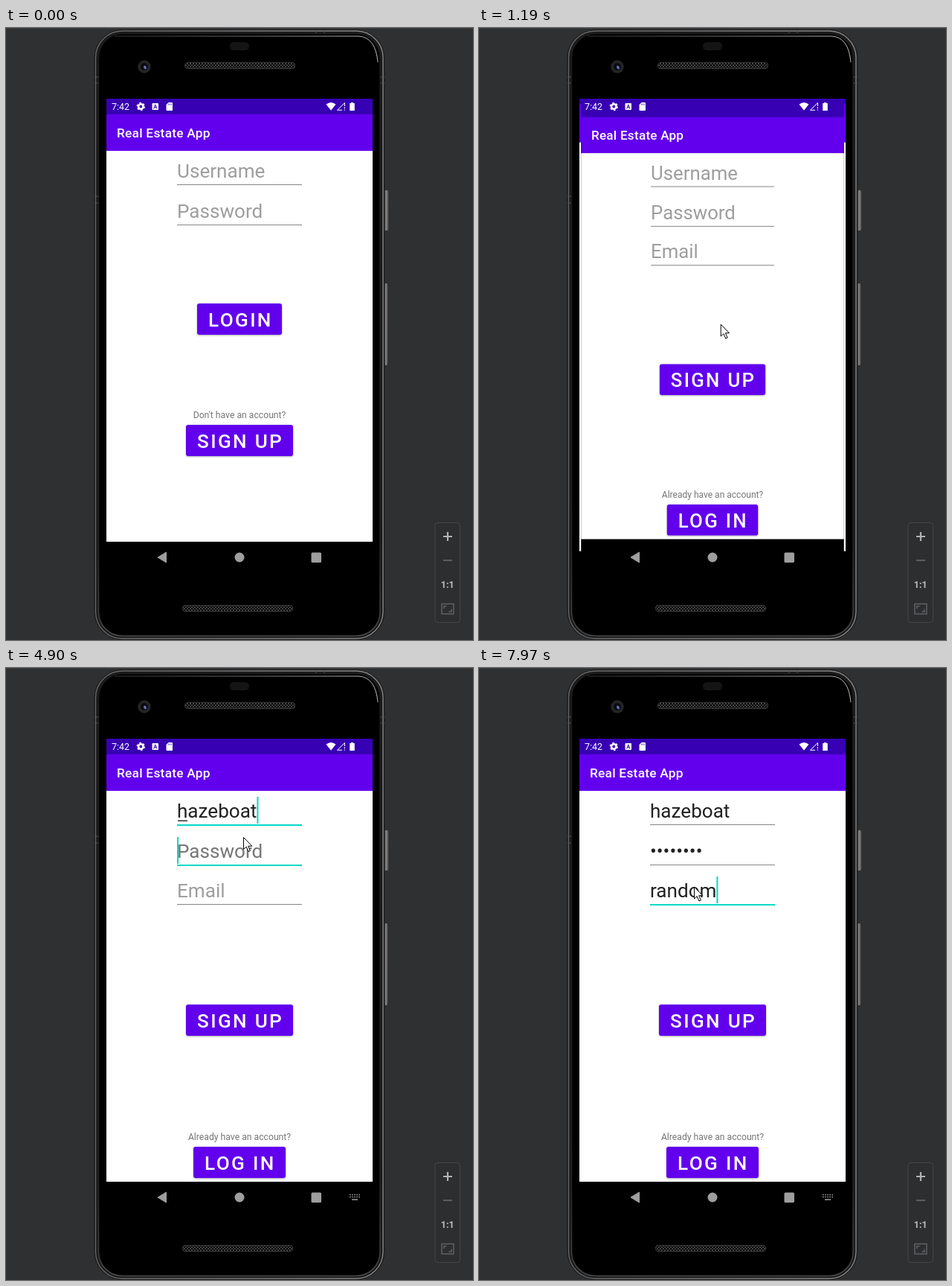
Write an HTML page that moves like this. It is 628x822 px and loops after 8000 ms.

```html
<!DOCTYPE html>
<html lang="en">
<head>
<meta charset="utf-8">
<title>Sign-up flow</title>
<style>
  html, body { margin: 0; width: 100%; height: 100%; overflow: hidden; background: #2f3032; }
  svg { display: block; width: 628px; height: 822px; font-family: Roboto, "Open Sans", sans-serif; }
  .scene { transform-origin: 314px 413px; }
  .title { font-size: 17.4px; font-weight: 500; letter-spacing: .0125em; fill: #fff; }
  .hint, .val { font-size: 26.1px; }
  .hint { fill: #9e9e9e; }
  .pressed .hint { fill: #767676; }
  .val { fill: #212121; }
  .line { fill: #858585; }
  .focus .line { fill: #03dac5; height: 2px; }
  .caret { fill: #03dac5; }
  .note { font-size: 12.2px; fill: #757575; text-anchor: middle; }
  .button { filter: drop-shadow(0 1.3px 1.2px rgba(0, 0, 0, .32)); }
  .button.pressed { filter: drop-shadow(0 3.5px 3px rgba(0, 0, 0, .38)); }
  .button text { font-size: 26.1px; font-weight: 500; letter-spacing: .0892em; fill: #fff; }
  .clock { font-size: 12.5px; fill: #fff; }
</style>
</head>
<body>
<svg viewBox="0 0 628 822" xmlns="http://www.w3.org/2000/svg">
  <defs>
    <linearGradient id="rim">
      <stop offset="0" stop-color="#666"/><stop offset=".5" stop-color="#777"/><stop offset="1" stop-color="#8a8a8a"/>
    </linearGradient>
    <linearGradient id="shine">
      <stop offset="0" stop-color="#333"/><stop offset=".6" stop-color="#777"/><stop offset="1" stop-color="#bbb"/>
    </linearGradient>
    <linearGradient id="glow" x2="0" y2="1">
      <stop offset="0" stop-color="#1c1c1c"/><stop offset=".85" stop-color="#222"/><stop offset="1" stop-color="#4a4a4a"/>
    </linearGradient>
    <linearGradient id="key">
      <stop offset="0" stop-color="#333"/><stop offset=".5" stop-color="#8a8a8a"/><stop offset="1" stop-color="#444"/>
    </linearGradient>
    <pattern id="mesh" width="4" height="4" patternUnits="userSpaceOnUse">
      <path d="M0 0L4 4M4 0L0 4" stroke="#484848" stroke-width=".9"/>
    </pattern>
    <clipPath id="screen"><rect x="135" y="95" width="358" height="636"/></clipPath>
    <clipPath id="face"><rect x="242" y="533" width="144" height="42" rx="3"/></clipPath>
  </defs>

  <rect width="628" height="822" fill="#2f3032"/>
  <rect width="628" height="1" fill="#3c3d3f"/>

  <!-- phone body -->
  <g>
    <rect x="508" y="218" width="6.5" height="54" rx="2" fill="url(#key)"/>
    <rect x="508" y="343" width="5.5" height="110" rx="2" fill="url(#key)"/>
    <rect x="118.5" y="2.5" width="390.500" height="819" rx="38" fill="#1a1a1a" stroke="#202020"/>
    <rect x="120.5" y="4" width="386.500" height="816" rx="36" fill="none" stroke="url(#rim)" stroke-width="1.400"/>
    <rect x="124.5" y="7.5" width="378.5" height="809" rx="32" fill="#000" stroke="url(#glow)" stroke-width="1.500"/>
    <path d="M146 11H474Q497 12 500 46" fill="none" stroke="url(#shine)"/>
    <path d="M119 66h5M119 74h5M119 226h5M119 235h5M504 66h5M504 74h5M417 3v4M428 3v4" stroke="#555"/>
    <rect x="301" y="19" width="26" height="11" rx="5" fill="#141414"/>
    <circle cx="186" cy="52" r="8" fill="#242424" stroke="#303030"/>
    <circle cx="186" cy="52" r="5" fill="#0b0b12"/>
    <ellipse cx="187" cy="53" rx="1.7" ry="2.5" fill="#6a6fb8" transform="rotate(-30 187 53)"/>
    <g fill="url(#mesh)" stroke="#3a3a3a">
      <rect x="240.500" y="46.500" width="148" height="8" rx="3.500"/>
      <rect x="237.500" y="775.500" width="148" height="8" rx="3.500"/>
    </g>
  </g>

  <g clip-path="url(#screen)">
    <g id="login" class="scene"></g>
    <g id="signup" class="scene"></g>
  </g>

  <!-- status bar -->
  <g fill="#fff">
    <text class="clock" x="142" y="110">7:42</text>
    <circle cx="181.300" cy="105.500" r="3.200" fill="none" stroke="#fff" stroke-width="2.600"/>
    <circle cx="181.300" cy="105.500" r="4.900" fill="none" stroke="#fff" stroke-width="1.600" stroke-dasharray="2.560"/>
    <rect x="196.500" y="101" width="8.500" height="9" rx="1"/>
    <path d="M198.600 108.500L200.750 102.800L202.900 108.500M199.400 106.700H202.100" fill="none" stroke="#3700b3"/>
    <path d="M218.500 100H223a1 1 0 0 1 1 1V110a1 1 0 0 1 -1 1H216.500a1 1 0 0 1 -1 -1V103Z"/>
    <path d="M218.500 101.500v2M220.500 101.500v2M222.500 101.500v2" stroke="#3700b3" stroke-width=".8"/>
    <path d="M430.500 102.500Q437 97.500 443.500 102.500L437 110.800Z"/>
    <path d="M455.500 105V100.500L445.500 110.300H452M455.300 106v2.500M455.300 109.500v1.300" fill="none" stroke="#fff"/>
    <path d="M464 100h3v1h1.800V111h-6.600V101H464Z"/>
  </g>

  <!-- navigation bar -->
  <g fill="#9e9e9e">
    <path d="M204 711L215.500 704V718Z" stroke="#9e9e9e" stroke-linejoin="round"/>
    <circle cx="314" cy="711" r="6.500"/>
    <rect x="410.500" y="704.500" width="13.500" height="13.500" rx="1.500"/>
    <g id="keys" fill="none" stroke="#9e9e9e" stroke-width="1.500">
      <path d="M462 707.500H476M462 710.500H476" stroke-dasharray="1.600 1.500"/>
      <path d="M465 714H473"/>
    </g>
  </g>

  <!-- zoom panel -->
  <g fill="none" stroke="#afb1b3">
    <rect x="577" y="664.500" width="33.500" height="134" rx="4" fill="#2d2e30" stroke="#454648"/>
    <path d="M588 683H600M594 677V689" stroke-width="2.200"/>
    <path d="M588 715H600" stroke="#5c5e60" stroke-width="2"/>
    <text x="593.700" y="752" text-anchor="middle" font-size="12.500" font-weight="700" fill="#bbbdbf" stroke="none">1:1</text>
    <g stroke="#5f6163" stroke-width="1.500">
      <rect x="586" y="773.500" width="16" height="13.500"/>
      <path d="M589 780V776.500H592.500M595.500 784H599V780.500"/>
    </g>
  </g>

  <path id="mouse" d="M0 0V16L3.700 12.600L6.500 19L8.900 18L6.200 11.700H11.300Z" fill="#fff" stroke="#000" stroke-linejoin="round"/>
</svg>

<script>
const LOOP = 8000, FRAME = 66.3, BLINK = 530;
const $ = id => document.getElementById(id);
const clamp = v => Math.max(0, Math.min(1, v));

const field = (id, y, hint) => `
  <g id="${id}" transform="translate(230 ${y})">
    <text class="hint" y="28">${hint}</text>
    <text class="val" y="28"></text>
    <rect class="line" y="37" width="168" height="1"/>
    <rect class="mark" y="31.5" x="1" width="13" height="1.4" fill="#212121" visibility="hidden"/>
    <rect class="caret" width="2" height="36" visibility="hidden"/>
  </g>`;

const button = (id, x, y, w, label) => `
  <g id="${id}" class="button">
    <rect x="${x}" y="${y}" width="${w}" height="42" rx="3" fill="#6200ee"/>
    <text x="${x + 15.1}" y="${y + 31}">${label}</text>
  </g>`;

const page = body => `
  <rect x="135" y="95" width="358" height="636"/>
  <rect x="135" y="95" width="358" height="21.5" fill="#3700b3"/>
  <rect x="135" y="116" width="358" height="49.5" fill="#6200ee"/>
  <rect x="135" y="165" width="358" height="525" fill="#fff"/>
  <text class="title" x="148.9" y="147">Real Estate App</text>${body}`;

$('login').innerHTML = page(
  field('oldUser', 173, 'Username') + field('oldPass', 227, 'Password') +
  button('enter', 257, 370, 114, 'LOGIN') +
  '<text class="note" x="314" y="524">Don\'t have an account?</text>' +
  button('join', 242, 533, 144, 'SIGN UP') +
  '<circle id="ripple" cx="316" cy="558" fill="#fff" clip-path="url(#face)"/>');

$('signup').innerHTML = page(
  field('user', 173, 'Username') + field('pass', 227, 'Password') + field('mail', 280, 'Email') +
  button('submit', 242, 452, 144, 'SIGN UP') +
  '<text class="note" x="314" y="634">Already have an account?</text>' +
  button('back', 252, 643, 124, 'LOG IN'));

const inputs = [
  { id: 'user', text: 'hazeboat', keys: [2850, 2920, 3050, 3240, 3300, 3370, 3440, 3640],
    focus: [1860, 4970], press: [1860, 1920], resets: [1990], underlined: true },
  { id: 'pass', text: 'password', keys: [5040, 5170, 5240, 5370, 5930, 6030, 6100, 6170],
    focus: [4840, 7500], press: [4840, 4970], resets: [4840, 5400], hideAt: 7630 },
  { id: 'mail', text: 'random', keys: [7500, 7570, 7770, 7840, 7900, 7970],
    focus: [7170, LOOP], press: [7170, 7300], resets: [7170] },
];
for (const f of inputs) {
  f.el = $(f.id);
  for (const part of ['hint', 'val', 'caret', 'mark']) f[part] = f.el.querySelector('.' + part);
}

const within = (t, [a, b]) => t >= a && t < b;
const show = (el, on) => el.setAttribute('visibility', on ? 'visible' : 'hidden');

function drawInput(f, t) {
  const n = f.keys.filter(k => k <= t).length;
  let text = f.text.slice(0, n);
  if (f.hideAt && n) {
    const open = t < f.hideAt ? 1 : 0;
    text = '•'.repeat(n - open) + (open ? text[n - 1] : '');
  }
  if (f.val.textContent !== text) f.val.textContent = text;
  show(f.hint, !n);

  const focused = within(t, f.focus);
  f.el.classList.toggle('focus', focused);
  f.el.classList.toggle('pressed', within(t, f.press));
  const base = Math.max(0, ...[...f.keys, ...f.resets].filter(k => k <= t));
  show(f.caret, focused && base && (t - base) % (2 * BLINK) < BLINK);
  f.caret.setAttribute('x', n ? f.val.getComputedTextLength() : 0);
  show(f.mark, f.underlined && focused && n);
}

// Pointer moves: start, end, from x, y, to x, y
const moves = [
  [70, 800, 532, 791, 315.5, 556.5],
  [1015, 1720, 315.5, 556.5, 337.5, 198],
  [4370, 4800, 337.5, 198, 319.5, 227.5],
  [6740, 7165, 319.5, 227.5, 289.5, 294],
];

function drawMouse(t, tick) {
  show($('mouse'), t >= 70 && !within(t, [2190, 4370]));
  const [a, b, x0, y0, x1, y1] = moves.filter(m => m[0] <= t).pop() || moves[0];
  const p = 1 - (1 - clamp((tick - a) / (b - a))) ** 2;
  $('mouse').setAttribute('transform', `translate(${x0 + (x1 - x0) * p} ${y0 + (y1 - y0) * p})`);
}

// Fast start, very slow end: two joined cubic curves
function slowIn(x) {
  const curve = (u, a, b, c, d) =>
    a * (1 - u) ** 3 + 3 * b * u * (1 - u) ** 2 + 3 * c * u * u * (1 - u) + d * u ** 3;
  const [xs, ys] = x < 1 / 6
    ? [[0, .05, .1333, 1 / 6], [0, 0, .06, .4]]
    : [[1 / 6, .2083, .25, 1], [.4, .82, 1, 1]];
  let lo = 0, hi = 1;
  for (let i = 0; i < 20; i++) {
    const mid = (lo + hi) / 2;
    if (curve(mid, ...xs) < x) lo = mid; else hi = mid;
  }
  return curve(lo, ...ys);
}

function drawPages(t, tick) {
  const p = slowIn(clamp((tick - 1030) / 400));
  $('login').style.transform = `scale(${1 + .05 * p})`;
  $('signup').style.transform = `scale(${.85 + .15 * p})`;
  $('signup').style.opacity = clamp((tick - 1070) / 60);
  show($('login'), t < 1720);

  $('join').classList.toggle('pressed', within(t, [800, 1200]));
  const grow = clamp((tick - 850) / 220);
  $('ripple').setAttribute('r', t < 850 ? 0 : 12 + 80 * grow);
  $('ripple').setAttribute('opacity', .08 + .14 * grow);
}

function draw() {
  const t = performance.now() % LOOP;
  const tick = Math.floor((t + 10) / FRAME) * FRAME;
  drawPages(t, tick);
  inputs.forEach(f => drawInput(f, t));
  show($('keys'), t >= 4830);
  drawMouse(t, tick);
  requestAnimationFrame(draw);
}
draw();
</script>
</body>
</html>
```
